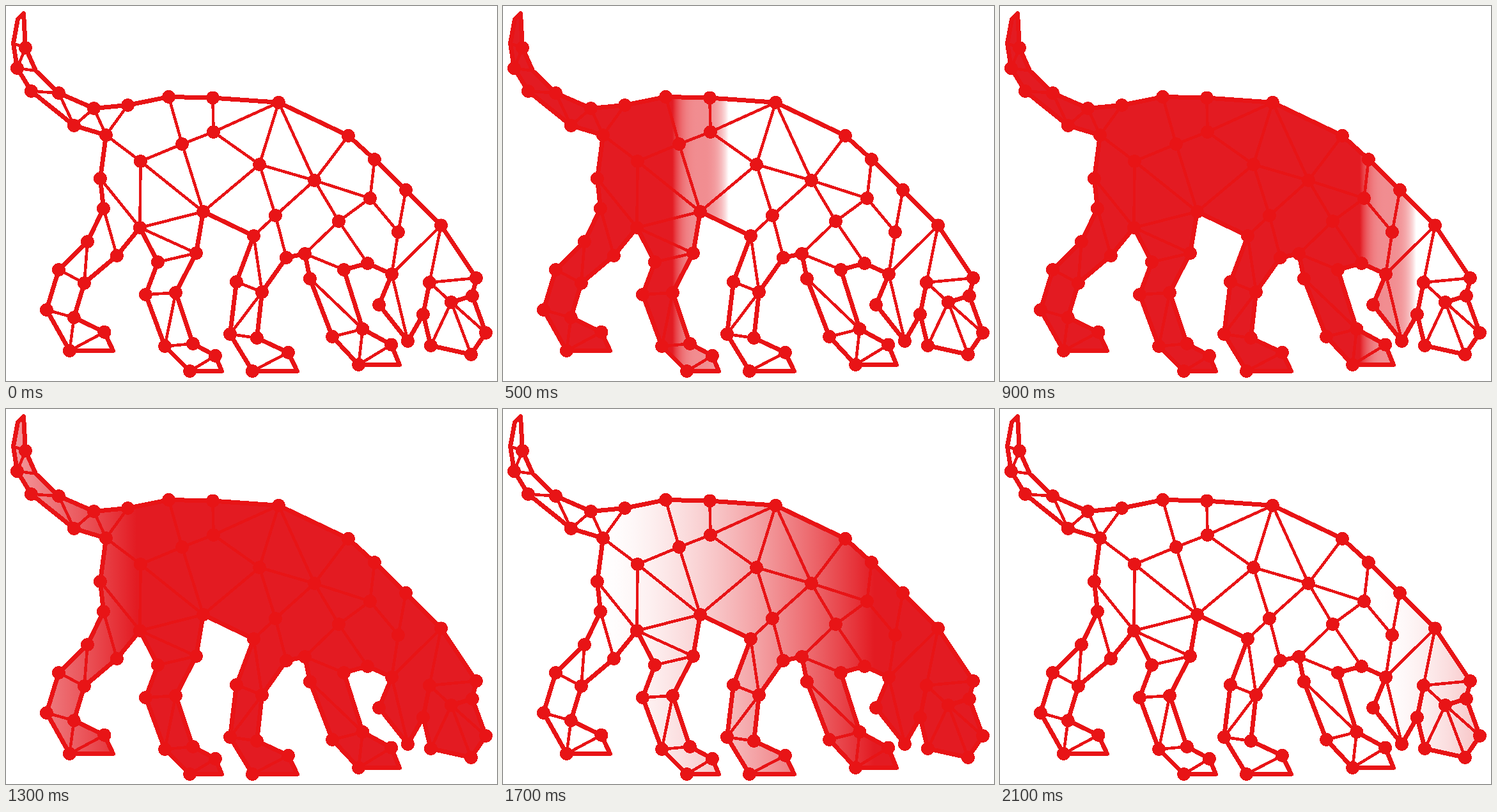
An HTML page for the animation above (2.2 s loop, 768 by 588 pixels).

```html
<!DOCTYPE html>
<html lang="en">
<head>
<meta charset="utf-8">
<title>Wireframe hound</title>
<style>
  html, body { margin: 0; width: 100%; height: 100%; overflow: hidden; background: #fff; }
  svg { display: block; width: 100%; height: 100%; }
</style>
</head>
<body>
<svg viewBox="0 0 768 588" shape-rendering="crispEdges">
  <defs id="defs"></defs>
  <g transform="translate(.5 .5)">
    <path id="body"/>
    <g fill="none" stroke="#e81416" stroke-linejoin="round">
      <path id="struts" stroke-width="4.6"/>
      <path id="outline" stroke-width="7"/>
    </g>
    <g id="dots" fill="#e81416"/>
  </g>
</svg>
<script>
const $ = id => document.getElementById(id);

function add(parent, tag, attrs) {
  const node = document.createElementNS('http://www.w3.org/2000/svg', tag);
  for (const [name, value] of Object.entries(attrs)) node.setAttribute(name, value);
  return parent.appendChild(node);
}

// Level over the rump, bending smoothly into the sloping neck.
const spineY = x => 138 + 0.52 * (x - 487 + Math.hypot(x - 487, 60));
const spine = [254, 323, 426, 535, 576, 625, 680].map(x => `${x},${spineY(x)}`).join(' ');

// Instep, toe, tip of the sole, heel.
const foot = (x, y, length, height) =>
  `${x + length * .1},${y - height} ${x + length * .8},${y - height * .56} ${x + length},${y}* ${x},${y}`;

// Silhouette clockwise from the tail tip; * marks a corner without a dot.
const contour = {
  t: '18,20* 27,11* 30,65 46,101* 82,136 137,160',
  b: `190,155 ${spine}`,
  h: '735,426 729,454 750,512 727,546 664,532 652,483 628,525 583,468 603,420',
  f: `565,403 528,413 ${foot(551, 562, 64, 56)} 510,518 475,427 467,388`,
  g: `438,394 400,448 ${foot(385, 572, 70, 52)} 350,514 360,432 387,360`,
  k: `308,322 297,387 265,449 ${foot(287, 572, 50, 43)} 248,533 218,452 237,401`,
  r: `209,347 173,391 122,434 ${foot(99, 540, 68, 52)} 63,476 82,413 127,369 152,317 147,270 156,202`,
  u: '106,187 39,133 17,97 11,58*'
};
const inner = '210,243 275,216 324,197 396,248 482,273 421,328 520,337 569,301 613,354 662,433 696,464';

// Climbing a leg from the toes: F steps up the front, B up the back, X both.
const climbs = { f: 'FBB', g: 'XFBB', k: 'XFBX', r: 'FBXBXX' };

// Remaining chains of points, each named by part letter and index.
const chains = `u3-t2-u2-t3 u1-t4-u0-t5-r12-b0 r12-i0-i1-i2-b3 b1-i1-k0 b2-i2-i3
  r0-i0-k0-r0-k1 k0-i3-b3-i4-i3 b4-i4-i7 i4-i5 i4-i6 i3-i5-g8 i5-g0
  f8-i6-i7 i6-f0 b5-i7-i8 b6-i8-h8-b7 h8-h6 b7-i9-h0 i9-i10-h4 h3-i10-h2 f8-f1`;
const thickChains = 'i9-h5 i10-h1';

const points = {};
for (const [part, list] of Object.entries({ ...contour, i: inner })) {
  list.split(' ').forEach((item, n) => {
    const [cx, cy] = item.replace('*', '').split(',');
    points[part + n] = `${cx},${cy}`;
    if (!item.endsWith('*')) add($('dots'), 'circle', { cx, cy, r: 10.5 });
  });
}

function rungs([part, steps]) {
  const tip = contour[part].split(' ').findIndex(item => item.endsWith('*'));
  let front = tip - 1, back = tip + 1;
  const rung = () => `${part}${front}-${part}${back}`;
  return [rung(), ...[...steps].map(step => {
    if (step !== 'B') front--;
    if (step !== 'F') back++;
    return rung();
  })].join(' ');
}

const chainPath = text => text.split(/\s+/)
  .map(chain => 'M' + chain.split('-').map(name => points[name]).join('L')).join('');
const silhouette = 'M' + Object.values(contour).join(' ').replaceAll('*', '').split(' ').join('L') + 'Z';

$('body').setAttribute('d', silhouette);
$('outline').setAttribute('d', silhouette + chainPath(thickChains));
$('struts').setAttribute('d', chainPath([chains, ...Object.entries(climbs).map(rungs)].join(' ')));

function makeGradient(id, opacity) {
  const gradient = add($('defs'), 'linearGradient', { id, gradientUnits: 'userSpaceOnUse', y1: 0, y2: 0 });
  for (let u = 0; u <= 1; u += 1 / 16) {
    add(gradient, 'stop', { offset: u, 'stop-color': '#e31b22', 'stop-opacity': opacity(u) });
  }
}
makeGradient('fillIn', u => 0.5 + 4 * (0.5 - u) ** 3);
makeGradient('fadeOut', u => (1 - u) ** 1.6);

function useGradient(id, solidX, clearX) {
  $(id).setAttribute('x1', solidX);
  $(id).setAttribute('x2', clearX);
  $('body').setAttribute('fill', `url(#${id})`);
}

const LOOP = 2200, STEP = 100;

function draw(time) {
  const t = Math.floor(time % LOOP / STEP) * STEP;
  if (t < 1200) {
    const front = -20 + t * 0.745;
    useGradient('fillIn', front - 88, front);
  } else {
    useGradient('fadeOut', 580 + (t - 1700) * 0.94, 150 + (t - 1700) * 1.1);
  }
}

const start = performance.now();
function tick() {
  draw(performance.now() - start);
  requestAnimationFrame(tick);
}
tick();
</script>
</body>
</html>
```
